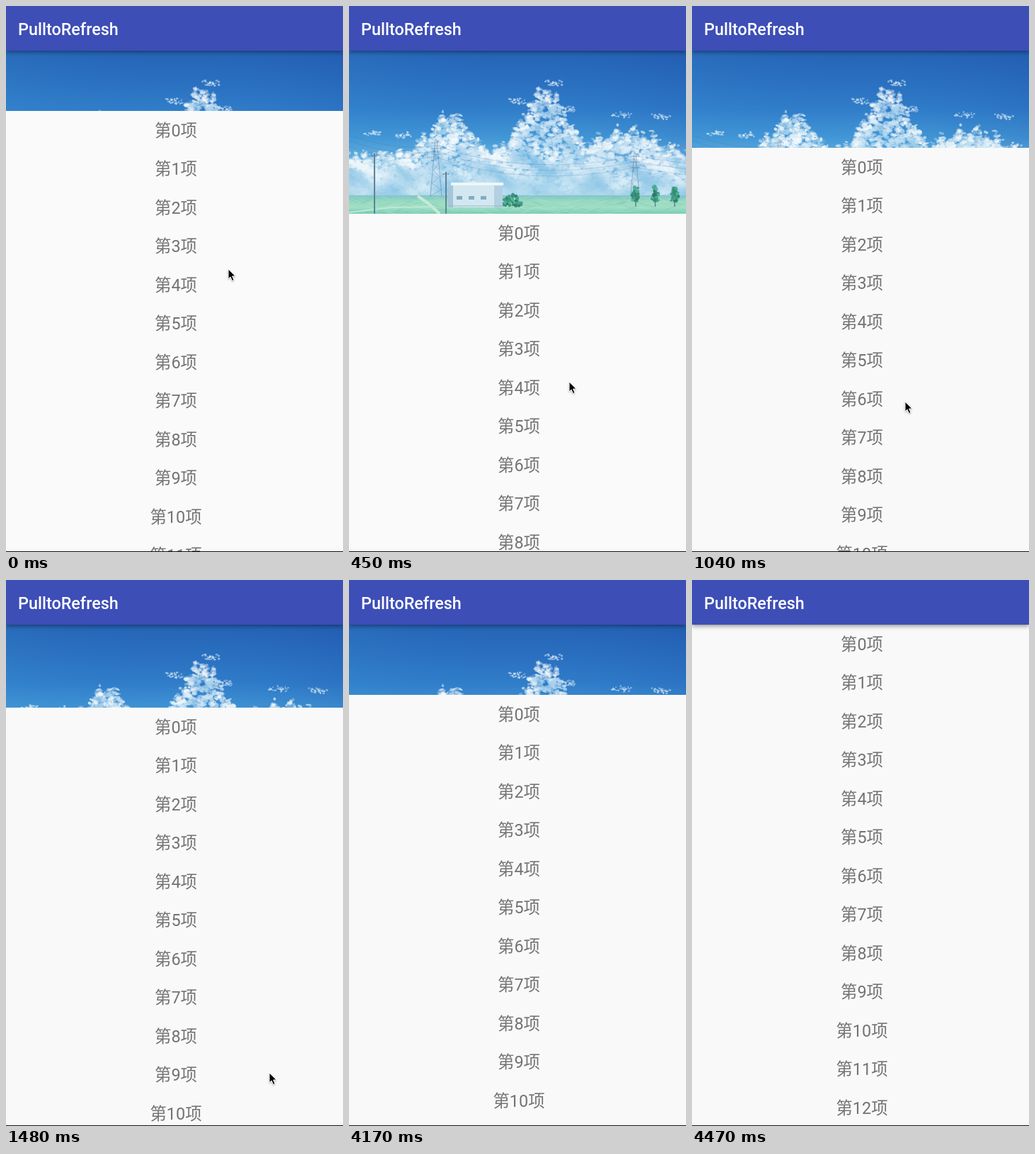
These frames come from a looping animation (476 px wide and 770 px high, 5910 ms). An HTML page with a canvas:

```html
<!DOCTYPE html>
<html lang="zh-CN">
<head>
<meta charset="utf-8">
<style>
  html, body { margin: 0; width: 100%; height: 100%; overflow: hidden; }
  #stage { position: relative; width: 476px; height: 770px; overflow: hidden; font-family: Roboto, "Noto Sans CJK SC", "Noto Sans CJK", sans-serif; }
  #stage > * { position: absolute; left: 0; top: 0; }
  #list { width: 480px; height: 770px; color: #737373; font-size: 23.4px; text-align: center; }
  #list div { height: 54.47px; line-height: 57px; white-space: nowrap; }
  #bar { width: 459px; height: 63px; padding-left: 17px; background: #3d4eb7; color: #fff; font-size: 23.4px; font-weight: 500; line-height: 66px; box-shadow: 0 2px 6px rgba(0, 0, 0, .42); }
  #stage > #edge { top: 769px; width: 476px; height: 1px; background: #111; }
  #cursor { overflow: visible; filter: drop-shadow(0 1px 1px rgba(0, 0, 0, .3)); }
</style>
</head>
<body>
<div id="stage">
  <canvas id="sky" width="476" height="293"></canvas>
  <div id="list"></div>
  <div id="bar">PulltoRefresh</div>
  <div id="edge"></div>
  <svg id="cursor" width="14" height="20"><path d="M1 1V15L4 12l2.5 5.600 2.500-1.100L6.600 11H11z" stroke="#fff"/></svg>
</div>
<script>
const $ = id => document.getElementById(id);
const { sin, cos, exp, min, max, floor } = Math;
const list = $('list'), cursor = $('cursor'), c = $('sky').getContext('2d');
for (let i = 0; i < 14; i++) list.appendChild(document.createElement('div')).textContent = `第${i}项`;

let seed = 7;
const rnd = () => (seed = seed * 16807 % 2147483647) / 2147483647;
const spread = size => (rnd() - .5) * size;
const rect = (color, x, y, w, h) => { c.fillStyle = color; c.fillRect(x, y, w, h); };
const blob = (color, x, y, rx, ry = rx) => {
  c.fillStyle = color;
  c.beginPath();
  c.ellipse(x, y, rx, ry, spread(1), 0, 7);
  c.fill();
};
const line = (color, width, ...p) => {
  c.strokeStyle = color;
  c.lineWidth = width;
  c.beginPath();
  for (let i = 0; i < p.length; i += 2) c.lineTo(p[i], p[i + 1]);
  c.stroke();
};
const gradient = (x0, y0, x1, y1, ...colors) => {
  const g = c.createLinearGradient(x0, y0, x1, y1);
  colors.forEach((color, i) => g.addColorStop(i / (colors.length - 1), color));
  return g;
};

function drawSky() {
  rect(gradient(0, 63, 0, 268, '#2563b5', '#2a6fbf', '#307dc9', '#4398d6', '#7cbfe6', '#b4dfee'), 0, 63, 476, 230);
  rect(gradient(0, 200, 476, 63, 'rgba(60,150,215,.2)', 'rgba(40,110,200,0)', 'rgba(25,70,165,.2)'), 0, 63, 476, 230);
}

// Each dome: centre, height, width
const domes = [[143, 56, 38], [277, 93, 41], [392, 34, 58]];
const ridge = x => 212 - max(...domes.map(([mid, h, w]) => h * exp(-(((x - mid) / w) ** 2)))) + 4 * sin(x * .23) + 3 * sin(x * .51);

function drawClouds() {
  for (let i = 0; i < 5000; i++) {
    const x = rnd() * 476, top = ridge(x), depth = rnd(), y = top + depth * (266 - top);
    const fold = sin(x * .09 + 2 * sin(y * .07)) + sin(y * .15 - x * .06 + sin(x * .13));
    const light = 92 - 9 * depth + 6 * fold + spread(6);
    c.globalAlpha = min(.55, .3 + (y - top) / 60);
    blob(`hsl(203 65% ${min(98, light)}%)`, x, y, 1.5 + rnd() * 4, 1 + rnd() * 2.5);
  }
  // Sunlit crumbs along the ridge
  for (let i = 0; i < 420; i++) {
    const x = rnd() * 476;
    c.globalAlpha = .3 + rnd() * .5;
    blob('#f2f9f8', x, ridge(x) + 5 + spread(24), 1 + rnd() * 3.5, .7 + rnd() * 2);
  }
  // Loose wisps
  for (const [x, y] of [[288, 109], [311, 146], [240, 134], [35, 180], [76, 182], [386, 154], [440, 156]]) {
    for (let i = 0; i < 26; i++) {
      c.globalAlpha = .25 + rnd() * .5;
      blob('#dcedf6', x + spread(15) + spread(15), y + spread(5) + spread(6), .7 + rnd() * 2, .6 + rnd());
    }
  }
  c.globalAlpha = 1;
  rect(gradient(0, 215, 0, 268, 'rgba(165,212,235,0)', 'rgba(165,212,235,.5)'), 0, 215, 476, 53);
}

function pylon(x, top, bottom, w) {
  const color = 'rgba(85,120,155,.6)';
  line(color, .8, x - w, bottom, x - 1, top, x + 1, top, x + w, bottom);
  for (let y = top + 8, side = w; y < bottom - 6; y += 9, side = -side) {
    const at = v => (v - top) / (bottom - top);
    line(color, .6, x - side * at(y), y, x + side * at(y + 9), y + 9);
  }
  for (let i = 0; i < 3; i++) line(color, .8, x - 7, top + 5 + i * 8, x + 7, top + 5 + i * 8);
}

function bush(x, y, w, h, n) {
  for (let i = 0; i < n; i++) blob(`hsl(${165 + spread(16)} 42% ${42 + spread(20)}%)`, x + spread(w), y + spread(h), 1 + rnd() * 1.5);
}

function drawLand() {
  rect(gradient(0, 266, 0, 293, '#80c4c8', '#97d8c2', '#a0dfc4', '#7ccdb6'), 0, 267, 476, 26);
  for (let i = 0; i < 160; i++) blob(i % 2 ? 'rgba(90,185,165,.2)' : 'rgba(190,232,205,.3)', rnd() * 476, 270 + rnd() * 23, 3 + rnd() * 14, .7);
  line('#c6ead8', 4, 97, 268, 113, 279, 128, 293);
  line('#bce8d4', 2, 0, 291, 60, 284, 118, 283);

  for (let drop = 0; drop < 20; drop += 8) {
    c.beginPath();
    c.moveTo(0, 182 + drop);
    c.quadraticCurveTo(65, 205 + drop, 123, 197 + drop);
    c.quadraticCurveTo(250, 242 + drop, 404, 212 + drop);
    c.lineTo(476, 222 + drop);
    c.lineWidth = .6;
    c.strokeStyle = 'rgba(65,105,150,.35)';
    c.stroke();
  }
  pylon(123, 188, 268, 8);
  pylon(404, 207, 266, 6);
  for (const [x, top] of [[36, 208], [137, 234]]) {
    line('#5f8198', 2, x, top, x, 293);
    line('#5f8198', 1, x - 5, top + 3, x + 5, top + 3);
  }

  rect('#a3c6d8', 140, 254, 8, 30);
  rect('#d3e7f1', 147, 252, 70, 32);
  rect('#edf6f9', 144, 249, 74, 4);
  rect('#b3d0e2', 205, 253, 12, 31);
  for (let x = 152; x < 190; x += 17) rect('#84abc4', x, 268, 8, 5);
  line('#86b4bd', .8, 142, 282, 217, 282);

  bush(228, 274, 20, 16, 60);
  bush(238, 279, 12, 6, 20);
  for (let x = 405; x < 476; x += 27.5) {
    line('#5d8579', 1.5, x, 255, x, 283);
    bush(x, 265, 6, 22, 30);
    bush(x, 269, 11, 12, 30);
  }
}

drawSky();
drawClouds();
drawLand();

// Pull until the header is open, spring back, later collapse under the bar
const listTop = n => n < 7
  ? min(293, 148 + 41.6 * n + n ** 4 / 4)
  : max(63, min(max(180, 293 - 93 * (n - 6)), 162 - 87 * (n - 28)));

// The pointer drags down, then leaves through the bottom edge
const exit = [[300, 557], [300, 553], [299, 540], [371, 694], [372, 698], [376, 699], [410, 739], [436, 769], [438, 769]];
const pointer = n => n < 7
  ? [313 - .36 * n * n, min(556, 370 + 50.3 * n + n ** 4 / 10)]
  : exit[n - 7] || [500, 800];

function draw(now) {
  const t = now % 5910, n = floor((t + 10) / 148.8);
  const [x, y] = pointer(n).map(Math.round);
  list.style.transform = `translateY(${Math.round(listTop(n))}px)`;
  list.style.background = n < 6 ? '#fafafa' : '#f9f9f9';
  cursor.style.transform = `translate(${x}px, ${y}px)`;
  requestAnimationFrame(draw);
}
draw(performance.now());
</script>
</body>
</html>
```
